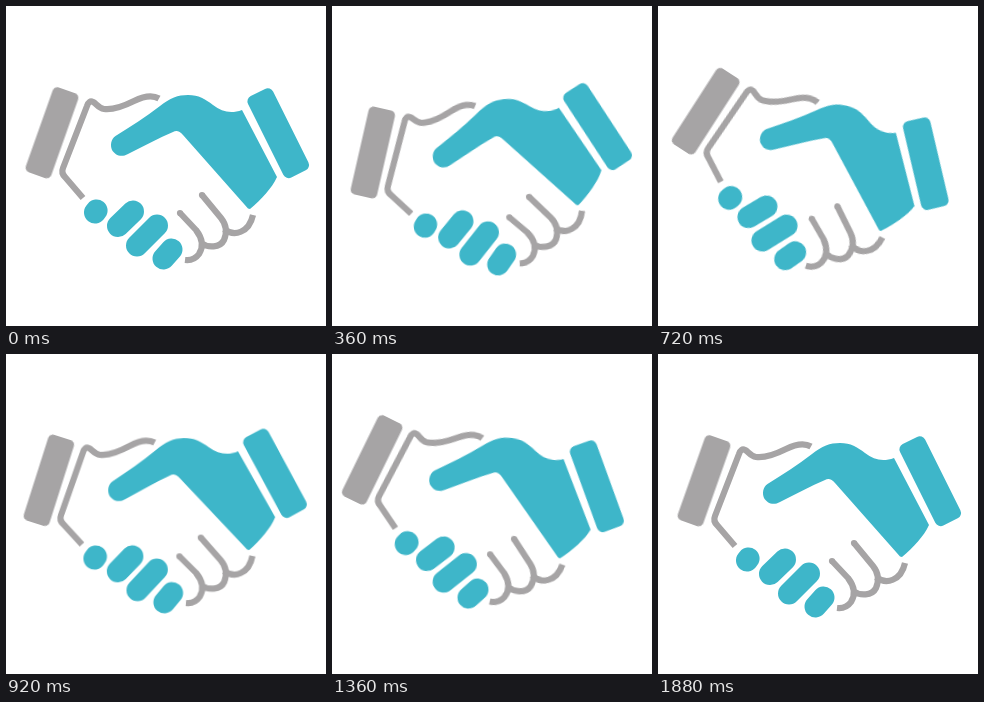
These frames come from a looping animation (320 px wide and 320 px high, 1920 ms). An HTML page:

```html
<!DOCTYPE html>
<html lang="en">
<head>
<meta charset="utf-8">
<title>Handshake</title>
<style>
  html, body { margin: 0; width: 100%; height: 100%; overflow: hidden; background: #fff; }
  svg { display: block; width: 100%; height: 100%; }
  .teal { fill: #3eb6c9; }
  .gray { fill: #a6a4a5; }
  .line { fill: none; stroke: #a6a4a5; stroke-width: 6.2; stroke-linejoin: round; }
  .fingers { fill: none; stroke: #3eb6c9; stroke-width: 22; stroke-linecap: round; }

  /* Straight moves between poses, advancing once every 40 ms */
  .shake { transform-origin: 160px 160px; animation: shake 1920ms infinite; }
  @keyframes shake {
    0%       { transform: translate(0px, 0px) rotate(0deg);           animation-timing-function: steps(6); }
    12.5%    { transform: translate(.7px, 6.4px) rotate(-14.1deg);    animation-timing-function: steps(11); }
    35.4167% { transform: translate(-9.4px, 5.9px) rotate(13.1deg);   animation-timing-function: steps(1); }
    37.5%    { transform: translate(-9px, 3.8px) rotate(13.3deg);     animation-timing-function: steps(9); }
    56.25%   { transform: translate(3.4px, -10.6px) rotate(-14deg);   animation-timing-function: steps(10); }
    77.0833% { transform: translate(-16.3px, -6.9px) rotate(15.4deg); animation-timing-function: steps(10); }
    97.9167%, 100% { transform: translate(0px, 0px) rotate(0deg); }
  }
</style>
</head>
<body>
<svg viewBox="0 0 320 320">
  <g class="shake">
    <!-- cuffs -->
    <rect class="gray" x="-13.5" y="-45" width="27" height="90" rx="5" transform="translate(46 126.8) rotate(19.5)"/>
    <rect class="teal" x="-14" y="-45.5" width="28" height="91" rx="6" transform="translate(272.2 127.2) rotate(-26.5)"/>

    <!-- left hand -->
    <path class="line" d="M153 92.5C146 88.5 138 90 128 95C116 101 106 104 98 103C92 102 90 97 87 96Q83 94 81 100L57 162Q55 167 59 171L77 192"/>
    <path class="line" d="M174 207L190 224Q200 237 193 248Q188 255 179 254M196 189L215 212Q223 222 218 234C214 242 202 242 195 237M218 223C228 231 243 227 247 209"/>
    <circle class="gray" cx="174" cy="207" r="3.1"/>
    <circle class="gray" cx="196" cy="189" r="3.1"/>

    <!-- right hand -->
    <path class="teal" d="M109.5 130C124 121 140 111 154 100C164 92 172 89 182 89C193 89 199 93 207 99C216 106 225 108 236 104L271 171C266 182 255 194 244 203L242 202.5L177 129Q172 123 167 126C153 132 138 140 122 148C115 152 109 149 106 144C104 139 105 133 109.5 130Z"/>
    <path class="fingers" d="M89 206.5L90.6 204.4M112 220L127 205.5M131 239.5L151 219.5M157.5 252.5L165.5 243.5"/>
  </g>
</svg>
</body>
</html>
```
